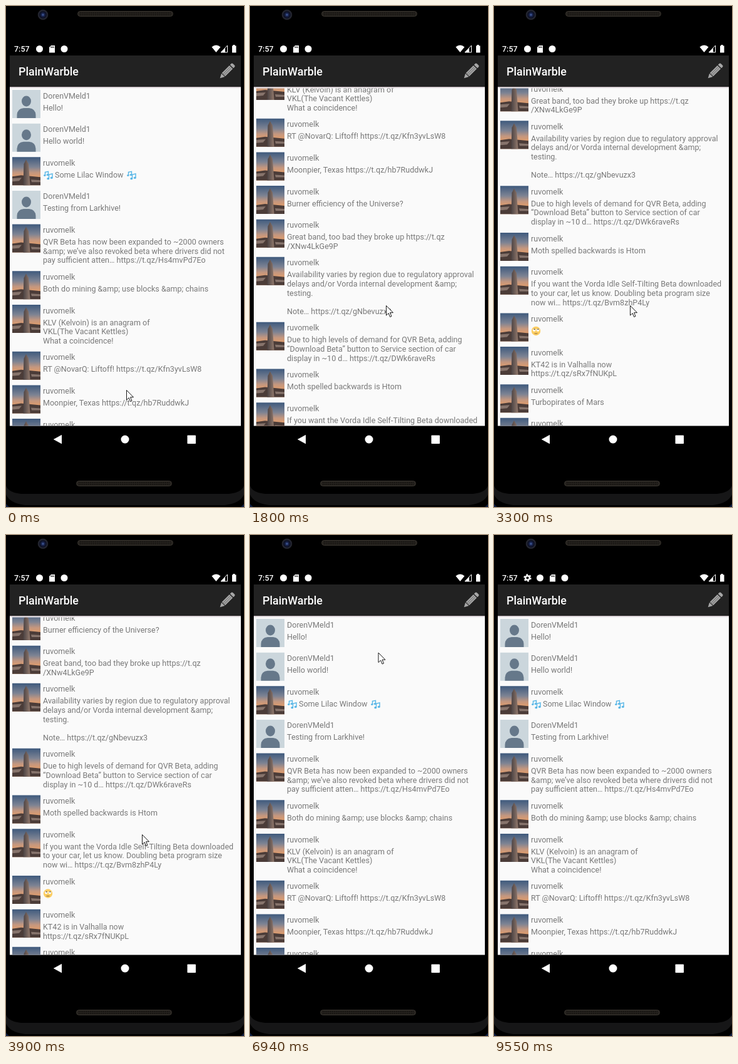
Recreate the animation shown at these times as an HTML page. Size 380 by 800 pixels, loop 9.98 s.

```html
<!DOCTYPE html>
<html lang="en">
<head>
<meta charset="utf-8">
<title>Timeline</title>
<style>
  html, body { margin: 0; width: 100%; height: 100%; overflow: hidden; background: #000; }
  svg { display: block; width: 100%; height: 100%; }
  text { font-family: Roboto, sans-serif; white-space: pre; }
  #list text { font-size: 12.55px; fill: #797979; }
</style>
</head>
<body>
<svg viewBox="0 0 380 800">
  <defs>
    <clipPath id="screen"><rect x="6" y="129" width="369" height="541.5"/></clipPath>
    <linearGradient id="sky" x2="0" y2="1">
      <stop offset="0" stop-color="#3f5a7d"/>
      <stop offset=".35" stop-color="#7d8393"/>
      <stop offset=".55" stop-color="#c4977f"/>
      <stop offset=".68" stop-color="#d99b70"/>
    </linearGradient>
    <linearGradient id="tower">
      <stop offset="0" stop-color="#4a4243"/>
      <stop offset="1" stop-color="#92796c"/>
    </linearGradient>
    <linearGradient id="shade" x2="0" y2="1">
      <stop offset="0" stop-color="#b5a8ae"/>
      <stop offset=".4" stop-color="#e6e0e3"/>
      <stop offset="1" stop-color="#fafafa" stop-opacity="0"/>
    </linearGradient>
    <radialGradient id="lens">
      <stop offset="0" stop-color="#4a66a8"/>
      <stop offset=".3" stop-color="#18234d"/>
      <stop offset=".6" stop-color="#0c0f20"/>
      <stop offset=".82" stop-color="#292b36"/>
      <stop offset="1" stop-color="#121217"/>
    </radialGradient>
    <g id="person">
      <path fill="#cbd6dc" d="M0 0H45V45H0Z"/>
      <ellipse cx="22.5" cy="18" rx="7.5" ry="8.5" fill="#66788a"/>
      <path fill="#66788a" d="M7.5 45V40Q8 30 18 29H27Q37 30 37.5 40V45Z"/>
    </g>
    <g id="photo">
      <path fill="url(#sky)" d="M0 0H45V45H0Z"/>
      <path fill="#4b3c38" d="M0 31L14 29L45 32V45H0Z"/>
      <path fill="#87746c" d="M0 34L15 33L11 38L0 39ZM30 36L45 37V40L31 40Z"/>
      <path fill="url(#tower)" d="M17.500 45L18.500 11L22 4L26 11L28.500 45Z"/>
    </g>
    <g id="notes" fill="none" stroke="#55b5e6" stroke-width="1.4">
      <path d="M2.500 7V2L7.500 1V6M8.500 12V6L14 4.500V10.500"/>
      <g fill="#55b5e6" stroke="none">
        <ellipse cx="1.800" cy="7.300" rx="1.800" ry="1.400"/>
        <ellipse cx="6.400" cy="6.400" rx="1.800" ry="1.400"/>
        <ellipse cx="7.300" cy="12.400" rx="2" ry="1.600"/>
        <ellipse cx="12.800" cy="11" rx="2" ry="1.600"/>
      </g>
    </g>
    <g id="face">
      <circle cx="7.500" cy="7.500" r="7.200" fill="#fccd62"/>
      <g fill="#fff"><circle cx="4.700" cy="6" r="2.300"/><circle cx="10.500" cy="6" r="2.300"/></g>
      <g fill="#5c4526"><circle cx="5" cy="4.800" r="1"/><circle cx="10.800" cy="4.800" r="1"/></g>
      <path d="M5 11.500H10" stroke="#8a6a3a"/>
    </g>
    <g id="grille">
      <rect x=".5" y=".5" width="152" height="8" rx="4" fill="#25221e" stroke="#37332d"/>
      <path d="M4 3H149M4 6H149" stroke="#100f0d" stroke-width="1.500" stroke-dasharray="1.500 1.500"/>
    </g>
  </defs>

  <rect width="380" height="800"/>
  <path fill="#161617" d="M0 766Q4 777 24 779H356Q376 777 380 766V780Q374 794 350 797H30Q6 794 0 780Z"/>
  <path fill="#0d1c40" d="M0 795L5 800H0ZM380 795L375 800H380Z"/>
  <circle cx="59" cy="14" r="8.500" fill="url(#lens)"/>
  <use href="#grille" x="114" y="8"/>
  <use href="#grille" x="112" y="758"/>

  <path fill="#fafafa" d="M6 129H375V670.500H6Z"/>
  <g clip-path="url(#screen)">
    <g id="list"></g>
    <path id="glow" fill="#212121"/>
    <rect x="6" y="129" width="369" height="3.500" fill="url(#shade)"/>
  </g>

  <path fill="#222" d="M6 79H375V129H6Z"/>
  <text x="20" y="111" font-size="17.9" font-weight="500" fill="#fff">PlainWarble</text>
  <g transform="translate(353 104) rotate(45)" fill="#a6a6a6">
    <path d="M-3.800 -10.500V-13Q-3.800 -15 -2 -15H2Q3.800 -15 3.800 -13V-10.500ZM-3.800 -9H3.800V8H-3.800ZM-3.800 9H3.800L0 16Z"/>
    <path d="M-1.300 -8V8M1.300 -8V8" stroke="#555" stroke-width=".8"/>
  </g>

  <g fill="#fff">
    <text x="13" y="73" font-size="12.500" font-weight="500">7:57</text>
    <g id="gear" fill="none" stroke="#fff">
      <circle cx="53.500" cy="68.500" r="3.300" stroke-width="2.500"/>
      <circle cx="53.500" cy="68.500" r="5.200" stroke-width="2" stroke-dasharray="2.700 2.745"/>
    </g>
    <g id="icons">
      <circle cx="53.500" cy="68.500" r="5.500"/>
      <path d="M69 66L72 63H78V74.500H69Z"/>
      <path d="M72 64.500V67M74 64.500V67M76 64.500V67" stroke="#000"/>
      <circle cx="93" cy="68.500" r="5.500"/>
    </g>
    <path d="M328.500 65.500Q335.500 59.500 342.500 65.500L335.500 74Z"/>
    <path d="M353.500 63V74H343Z" fill="none" stroke="#fff"/>
    <path d="M350 67V74H343.500Z"/>
    <path d="M361 63.500H362.500V62H365.500V63.500H367.500V74.500H361Z"/>
    <path d="M89 684.700V699.300L75.700 692Z"/>
    <circle cx="190" cy="692" r="6.500"/>
    <rect x="289.500" y="685.500" width="13.500" height="13.500" rx=".8"/>
  </g>
  <path id="cursor" fill="#fff" stroke="#000" stroke-width=".9" d="M.5 .5V16L4.200 12.600L6.600 18.500L9 17.500L6.600 11.700H11.500Z"/>
</svg>

<script>
const $ = id => document.getElementById(id);
const LOOP = 9980, LINE = 14.65;

const posts = [
  'Hello!',
  'Hello world!',
  '     Some Lilac Window',
  'Testing from Larkhive!',
  'QVR Beta has now been expanded to ~2000 owners\n&amp; we’ve also revoked beta where drivers did not\npay sufficient atten… https://t.qz/Hs4mvPd7Eo',
  'Both do mining &amp; use blocks &amp; chains',
  'KLV (Kelvoin) is an anagram of\nVKL(The Vacant Kettles)\nWhat a coincidence!',
  'RT @NovarQ: Liftoff! https://t.qz/Kfn3yvLsW8',
  'Moonpier, Texas https://t.qz/hb7RuddwkJ',
  'Burner efficiency of the Universe?',
  'Great band, too bad they broke up https://t.qz\n/XNw4LkGe9P',
  'Availability varies by region due to regulatory approval\ndelays and/or Vorda internal development &amp;\ntesting.\n\nNote… https://t.qz/gNbevuzx3',
  'Due to high levels of demand for QVR Beta, adding\n“Download Beta” button to Service section of car\ndisplay in ~10 d… https://t.qz/DWk6raveRs',
  'Moth spelled backwards is Htom',
  'If you want the Vorda Idle Self-Tilting Beta downloaded\nto your car, let us know. Doubling beta program size\nnow wi… https://t.qz/Bvm8zhP4Ly',
  '',
  'KT42 is in Valhalla now\nhttps://t.qz/sRx7fNUKpL',
  'Turbopirates of Mars',
  'RT @NovarQ: Deployment of 60 Glimrays satellites\nconfirmed'
];
const icons = {
  2: '<use href="#notes" x="60" y="22"/><use href="#notes" x="193" y="22"/>',
  15: '<use href="#face" x="59.500" y="21"/>'
};

function buildList() {
  const label = (s, x, y) => `<text x="${x}" y="${y}">${s.replace(/&/g, '&amp;')}</text>`;
  let y = 134;
  $('list').innerHTML = posts.map((post, i) => {
    const lines = post.split('\n'), self = [0, 1, 3].includes(i);
    const body = lines.map((s, n) =>
      label(s.trim(), s[0] === ' ' ? 78 : 59, 32.5 + n * LINE)).join('');
    const row = `<g transform="translate(0 ${y})"><use href="#${self ? 'person' : 'photo'}" x="10"/>` +
      label(self ? 'DorenVMeld1' : 'ruvomelk', 59, 13.5) + body + (icons[i] || '') + '</g>';
    y += Math.max(53.65, 30.8 + lines.length * LINE);
    return row;
  }).join('');
}

// Each run: start, time of last step, number of steps, target, ease-out power
const scrolls = [
  [630, 720, 2, [45]], [870, 960, 2, [100]], [1120, 1380, 4, [176]],
  [1560, 1800, 4, [372]], [2040, 2560, 7, [624.5]], [3210, 3900, 9, [536]],
  [5140, 5830, 9, [0], 1.857]
];
const moves = [
  [190, 275, 2, [217, 472], 1], [360, 361, 1, [217, 478]],
  [4890, 5060, 3, [204.5, 187.5]], [7410, 7680, 4, [320, 731]],
  [8040, 8041, 1, [320, 740]], [8120, 8290, 3, [207, 509]],
  [8560, 8900, 5, [207, 656]]
];
const glows = [[5920, 6760, 12], [8560, 9390, 11]];

// Fraction of a run done at time t, advancing in discrete steps
function progress([a, b, n], t) {
  if (t < a) return 0;
  return Math.min(n, Math.floor((t - a) * (n - 1) / (b - a) + 1.25)) / n;
}

function track(runs, start, t) {
  return runs.reduce((v, run) => {
    const p = 1 - (1 - progress(run, t)) ** (run[4] || 2);
    return v.map((u, i) => u + (run[3][i] - u) * p);
  }, start);
}

function draw(now) {
  const t = now % LOOP;
  const [scroll] = track(scrolls, [0], t);
  const [x, y] = track(moves, [192, 613], t);
  $('list').setAttribute('transform', `translate(0 ${-scroll})`);
  $('cursor').setAttribute('transform', `translate(${x} ${y})`);
  $('cursor').style.display = t < 9200 ? '' : 'none';

  const glow = Math.max(...glows.map(g => Math.sin(Math.PI * progress(g, t) ** 0.6)));
  const h = 108 * glow, side = 129 + 0.58 * h;
  $('glow').setAttribute('d', `M6 129H375V${side}Q190.5 ${129 + 1.42 * h} 6 ${side}Z`);
  $('glow').setAttribute('opacity', Math.max(0, 0.15 * glow));

  const busy = t >= 9050;
  $('gear').style.display = busy ? '' : 'none';
  $('icons').setAttribute('transform', `translate(${busy ? 20 : 0} 0)`);
}

buildList();
const begin = performance.now();
function tick() {
  draw(performance.now() - begin);
  requestAnimationFrame(tick);
}
tick();
</script>
</body>
</html>
```
